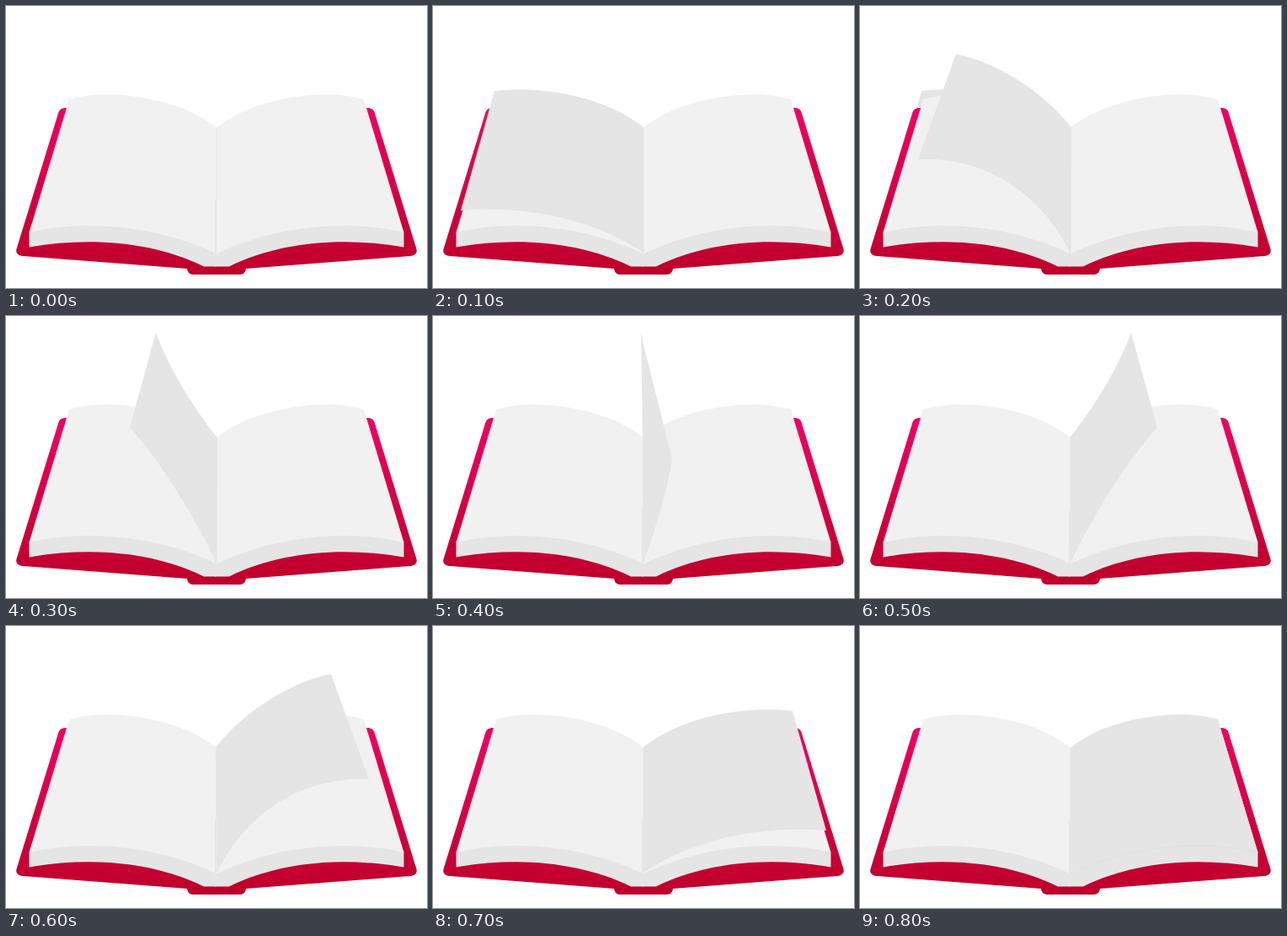
An HTML page that plays this animation: 500x335 px, repeating every 900 ms.

```html
<!DOCTYPE html>
<html lang="en">
<head>
<meta charset="utf-8">
<title>Page turning in an open book</title>
<style>
  html, body { margin: 0; width: 100%; height: 100%; overflow: hidden; background: #fff; }
  svg { display: block; width: 100%; height: 100%; }
  .paper { fill: #f1f1f1; }
  .shade { fill: #e5e5e5; }
</style>
</head>
<body>
<svg viewBox="0 0 500 335">
  <defs>
    <linearGradient id="red" gradientUnits="userSpaceOnUse" x1="0" y1="121" x2="0" y2="319">
      <stop offset="0" stop-color="#f00062"/>
      <stop offset="1" stop-color="#bd0029"/>
    </linearGradient>
    <g id="half">
      <path fill="url(#red)" d="M74 121H70Q64 121.500 62.500 126L13 287C10.500 293 14 296.500 20 297L215 312Q216 319 222 319H250.500V300L74 270Z"/>
      <path class="shade" d="M27.500 269V286.500C100 274 175 280 235 309.500H252V230H44Z"/>
      <path class="paper" d="M75 111C120 97 205 108 250 144.500H251V294.500H250C185 263 100 252 27.500 269Z"/>
    </g>
  </defs>
  <path id="trace" class="shade"/>
  <use href="#half"/>
  <use href="#half" transform="matrix(-1 0 0 1 500 0)"/>
  <path d="M250 145V293" stroke="#e3e3e3"/>
  <path id="page" class="shade"/>
  <path id="crease" d="M250 294C315 263 400 252 473 269" fill="none" stroke="#dcdcdc" stroke-width=".8"/>
</svg>
<script>
const STEP = 100;

// Left-hand poses: outer top corner, top edge to spine, bottom edge back out.
const flat = 'M75 111C120 97 205 108 250 144.500L250.500 294C185 263 100 252 27.500 269Z';
const lifted = 'M73 101C130 94 205 108 250 144L250 293C190 252 105 236 33 243Z';
const raised = 'M114 57C165 68 215 100 251 144L249.500 293C215 223 150 179 69 182Z';
const high = 'M178 20C195 65 222 108 250.500 144L250 293C222 235 185 175 147 132Z';
const upright = 'M247 19L249 144L250 293Q276 220 284 170L251 38Z';

const left = path => ({ path, mirror: false });
const right = path => ({ path, mirror: true });
const poses = [
  left(''), left(lifted), left(raised), left(high), left(upright),
  right(high), right(raised), right(lifted), right(flat)
];

const [page, trace, crease] = ['page', 'trace', 'crease'].map(id => document.getElementById(id));

function draw(now) {
  const step = Math.floor(now / STEP) % poses.length;
  const { path, mirror } = poses[step];
  page.setAttribute('d', path);
  page.setAttribute('transform', mirror ? 'matrix(-1 0 0 1 500 0)' : '');
  // The lifted page lingers behind the book for one more step.
  trace.setAttribute('d', path === raised && !mirror ? lifted : '');
  crease.style.display = path === flat ? '' : 'none';
}

const start = performance.now();
function tick() {
  draw(performance.now() - start);
  requestAnimationFrame(tick);
}
tick();
</script>
</body>
</html>
```
